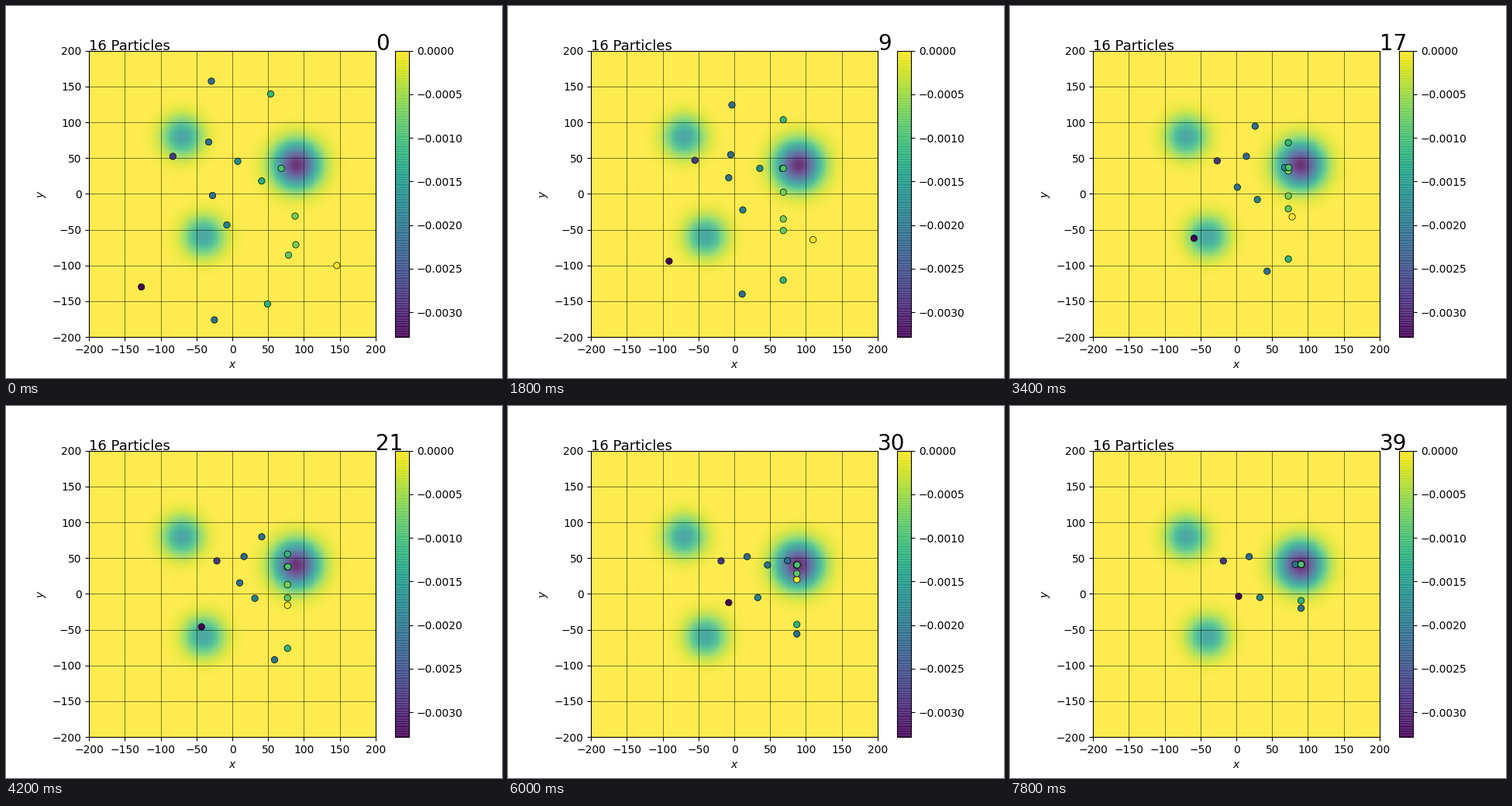
Recreate the animation shown at these times as a matplotlib script. Size 640 by 480 pixels, loop 8000 ms.

```python
import numpy as np
import matplotlib.pyplot as plt
from matplotlib.animation import FuncAnimation

FRAMES, INTERVAL = 40, 200
TOP_SPEED = 4.0            # limit per axis and frame
FIRM, SOFT = 0.7, 0.2      # pull towards the leader, and towards a stop
REACHED = 4                # a stop counts as reached within this distance
ALPHA = 0.8


def smoothstep(t, t0, t1):
    u = np.clip((t - t0) / (t1 - t0), 0, 1)
    return u * u * (3 - 2 * u)


# The leader rests on the flank of the deep well, then slides into it
slide = smoothstep(np.arange(FRAMES), 9, 36)[:, None]
leader = np.array([68.4, 35.6]) + slide * np.array([22.1, 5.6])


def fly(x, y, speed=TOP_SPEED, slow=False, stops=(), home=None):
    """Path via the stops, then to the home or else after the leader."""
    pos = np.array([x, y], float)
    ramp = np.array([4 if slow else 0.5, 0.5])   # frames to full speed
    stops = list(stops)
    path = [pos]
    for k in range(1, FRAMES):
        if stops and np.abs(pos - stops[0]).max() < REACHED:
            stops.pop(0)
        goal = stops[0] if stops else home
        gain = FIRM if goal is None else SOFT
        gap = (leader[k] if goal is None else goal) - pos
        cap = speed * np.minimum(1, (k - 0.5) / ramp)
        pos = pos + np.clip(gain * gap, -cap, cap)
        path.append(pos)
    return path


tracks = np.array([
    fly(-127, -130, home=(5, -2)),
    fly(-83, 52.4, slow=True, home=(-18, 46)),
    fly(-29.2, 157.4, speed=3.7, slow=True),
    fly(-33, 72.4, slow=True, home=(18, 52)),
    fly(-27.6, -2.3, slow=True, stops=[(-2, 27), (4, 4)]),
    fly(-7.6, -43.4, stops=[(11, -23)], home=(33, -5)),
    fly(-25, -176),
    fly(49.2, -153.8, speed=3.7, slow=True),
    fly(146, -100),
    fly(88.7, -71),
    fly(78.5, -85.5, speed=3.8),
    fly(87.7, -31, speed=3.7, slow=True),
    fly(53.6, 139.5, slow=True),
    fly(41, 18, slow=True),
    fly(7.6, 45.5, slow=True),
    leader,
])


# Landscape: one deep and two shallow Gaussian wells
def well(cx, cy, depth, sigma):
    return -depth * np.exp(-((X - cx)**2 + (Y - cy)**2) / (2 * sigma**2))


axis = np.linspace(-200, 200, 200)
X, Y = np.meshgrid(axis, axis)
deep = 10 / (2 * np.pi * 22**2)
field = (well(90, 40, deep, 22) + well(-70, 80, deep / 2, 19)
         + well(-40, -60, deep / 2, 19))
low = field.min()

fig, ax = plt.subplots(figsize=(6.4, 4.8), dpi=100)
image = ax.imshow(field, origin="lower", extent=(-200, 200, -200, 200),
                  cmap="viridis", vmin=low, vmax=0, alpha=ALPHA,
                  interpolation="nearest")
ax.set_axisbelow(True)
ax.grid(color="black", lw=0.5, alpha=0.7)
ticks = np.arange(-200, 201, 50)
ax.set(xticks=ticks, yticks=ticks, xlabel="$x$", ylabel="$y$")

# Colour bar: 256 translucent cells whose shared edges overlap
bar = fig.colorbar(image, ax=ax, ticks=np.arange(-6, 1) * 0.0005)
bar.solids.set_visible(False)
rows = 370
strip = plt.get_cmap("viridis")((np.arange(rows) + 0.5) / rows)
strip[:, 3] = ALPHA
edges = np.round(np.linspace(0, rows - 1, 257)).astype(int)
strip[edges, 3] = 1 - (1 - ALPHA)**2
bar.ax.imshow(strip[:, None], origin="lower", extent=(0, 1, low, 0),
              aspect="auto", interpolation="nearest")

ax.text(-200, 201, "16 Particles", fontsize=13)
counter = ax.text(200, 201, "0", fontsize=20)
dots = ax.scatter(tracks[:, 0, 0], tracks[:, 0, 1], c=tracks[:, 0, 0], s=36,
                  cmap="viridis", edgecolors="black", linewidths=0.5, zorder=3)
ax.set(xlim=(-200, 200), ylim=(-200, 200))


def update(n):
    dots.set_offsets(tracks[:, n])
    counter.set_text(str(n))
    return dots, counter


anim = FuncAnimation(fig, update, frames=FRAMES, interval=INTERVAL,
                     repeat=True, repeat_delay=0)
plt.show()
```
